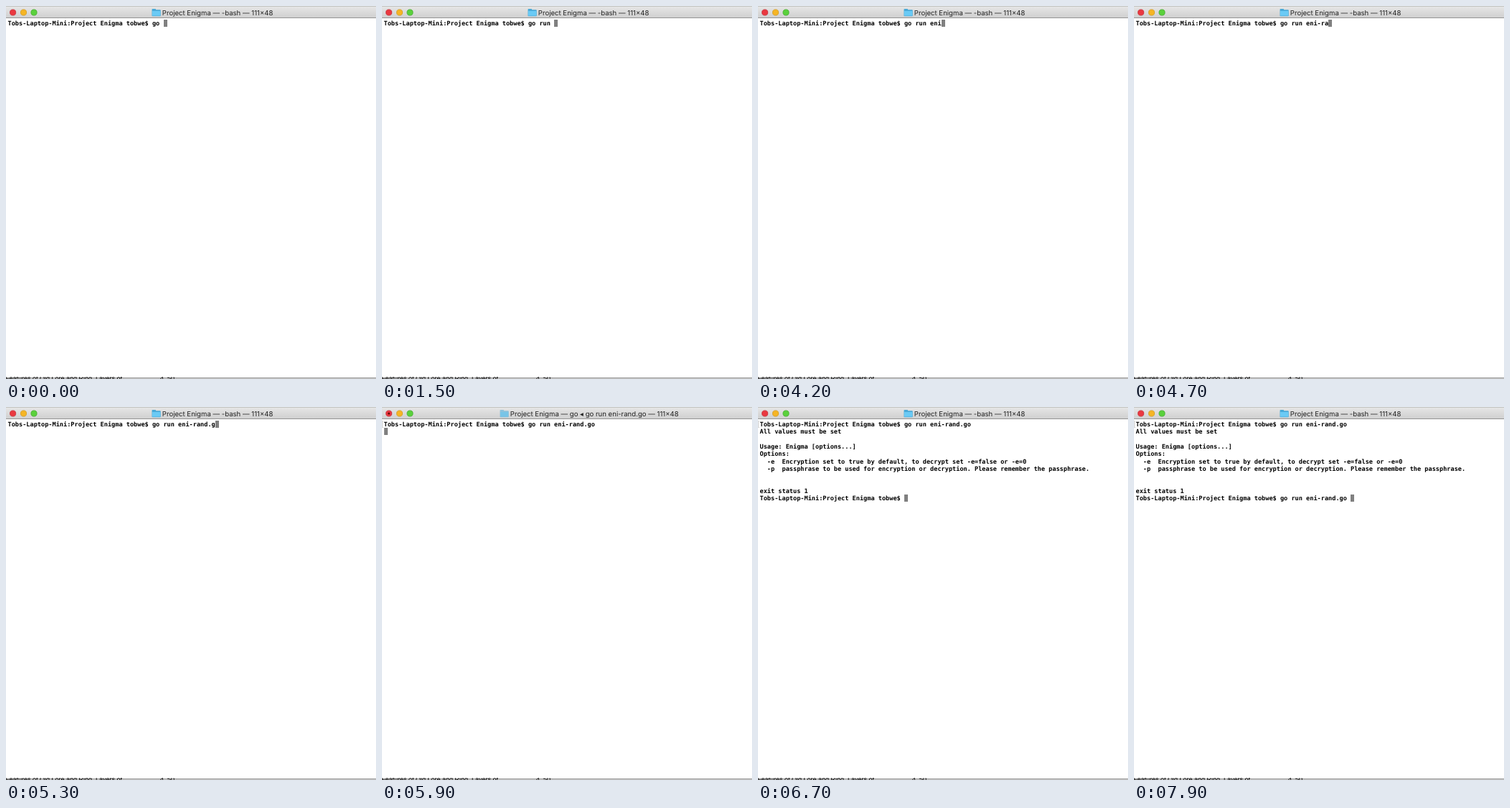
Write an HTML page with a canvas that moves like this. It is 516 px wide and 520 px high and loops after 8 s.

```html
<!DOCTYPE html>
<html lang="en">
<head>
<meta charset="utf-8">
<title>Terminal</title>
<style>
  html, body { margin: 0; width: 100%; height: 100%; overflow: hidden; background: #fff; }
  canvas { display: block; width: 516px; height: 520px; }
</style>
</head>
<body>
<canvas id="stage" width="516" height="520"></canvas>
<script>
const W = 516, H = 520, LOOP = 8000;
const ctx = document.getElementById('stage').getContext('2d');
ctx.textRendering = 'geometricPrecision';

const CELL_W = 5.167, CELL_H = 10.35, LEFT = 2.5, TOP = 18.6;
const MONO = 'bold 8.58px "DejaVu Sans Mono", monospace';
const SANS = '9.6px Inter, "DejaVu Sans", sans-serif';

const PROMPT = 'Tobs-Laptop-Mini:Project Enigma tobwe$ ';
const COMMAND = 'go run eni-rand.go';
const TYPED_AT_START = 3;
const KEY_TIMES = [900, 1100, 1300, 1500, 2600, 2800, 4200, 4400, 4600,
  4700, 4900, 5000, 5200, 5300, 5500];
const ENTER = 5800, OUTPUT = 6200, RECALL = 7000, LAST_SPACE = 7900;

const REPORT = [
  'All values must be set',
  '',
  'Usage: Enigma [options...]',
  'Options:',
  '  -e  Encryption set to true by default, to decrypt set -e=false or -e=0',
  '  -p  passphrase to be used for encryption or decryption. Please remember the passphrase.',
  '',
  '',
  'exit status 1'
];

// Each title change briefly shows a faded folder icon.
const TITLES = [
  { from: -1000, x: 203.5, text: '-bash' },
  { from: 5900, x: 164.5, text: 'go ◂ go run eni-rand.go', busy: true },
  { from: 6200, x: 163, text: 'link ◂ go run eni-rand.go', busy: true },
  { from: 6300, x: 203.5, text: '-bash' }
];

function rect(x, y, w, h, color) {
  ctx.fillStyle = color;
  ctx.fillRect(x, y, w, h);
}

function text(str, x, y, font, color) {
  ctx.font = font;
  ctx.fillStyle = color;
  ctx.fillText(str, x, y);
}

function disc(x, y, r, color, edge) {
  ctx.beginPath();
  ctx.arc(x, y, r, 0, Math.PI * 2);
  ctx.fillStyle = color;
  ctx.fill();
  if (edge) {
    ctx.strokeStyle = edge;
    ctx.lineWidth = 0.8;
    ctx.stroke();
  }
}

function folder(x, alpha) {
  ctx.save();
  ctx.globalAlpha = alpha;
  ctx.fillStyle = '#48a9d8';
  ctx.beginPath();
  ctx.roundRect(x, 4.1, 5.6, 4, 0.8);
  ctx.roundRect(x, 5.2, 12.2, 9, 0.8);
  ctx.fill();
  rect(x + 0.5, 7, 11.2, 6.6, '#6acaf5');
  ctx.restore();
}

function titleBar(t) {
  const shade = ctx.createLinearGradient(0, 0, 0, 16);
  shade.addColorStop(0, '#e7e7e7');
  shade.addColorStop(1, '#d0d0d0');
  rect(0, 0, W, 16, shade);
  rect(0, 0, W, 1, '#c2c4c0');
  rect(0, 16, W, 1, '#949494');

  const title = TITLES.findLast(item => t >= item.from);
  disc(9.6, 9, 4.1, '#ea3840', '#c4303a');
  disc(24.5, 9, 4.1, '#f6b524', '#d29a1e');
  disc(39, 9, 4.1, '#5ad13c', '#46ab30');
  if (title.busy) disc(9.6, 9, 1.6, '#6b0808');

  folder(title.x, t - title.from < 100 ? 0.55 : 1);
  text(`Project Enigma — ${title.text} — 111×48`, title.x + 14.3, 12.5, SANS, '#222');
}

function line(str, row) {
  text(str, LEFT, TOP + row * CELL_H + 8.3, MONO, '#000');
}

function cursor(col, row) {
  const x = Math.round(LEFT + col * CELL_W);
  const y = Math.round(TOP + row * CELL_H);
  rect(x, y, 5, 10, '#808080');
}

function inputLine(str, row) {
  line(PROMPT + str, row);
  cursor(PROMPT.length + str.length, row);
}

function promptMark() {
  ctx.strokeStyle = '#bdbdbd';
  ctx.lineWidth = 0.7;
  ctx.beginPath();
  ctx.moveTo(2, 19.5);
  ctx.lineTo(0.6, 19.5);
  ctx.lineTo(0.6, 28.5);
  ctx.lineTo(2, 28.5);
  ctx.stroke();
}

function terminal(t) {
  if (t < ENTER) {
    const typed = TYPED_AT_START + KEY_TIMES.filter(key => t >= key).length;
    inputLine(COMMAND.slice(0, typed), 0);
    return;
  }
  promptMark();
  line(PROMPT + COMMAND, 0);
  if (t < OUTPUT) {
    cursor(0, 1);
    return;
  }
  REPORT.forEach((str, i) => line(str, i + 1));
  const recalled = t < RECALL ? '' : COMMAND + (t < LAST_SPACE ? '' : ' ');
  inputLine(recalled, REPORT.length + 1);
}

// Sliver of the window behind, along the bottom edge.
function bottomEdge() {
  const font = '9px "Liberation Sans", Arial, sans-serif';
  ctx.save();
  ctx.beginPath();
  ctx.rect(0, 517, W, 3);
  ctx.clip();
  rect(0, 518, W, 1, '#8a8a8a');
  rect(0, 519, W, 1, '#d4d4d4');
  text('Features of Old Lore and Ring, Layers of', -1, 522, font, '#000');
  text('4, 50', 215, 522, font, '#000');
  ctx.restore();
}

function draw(now) {
  const t = now % LOOP;
  rect(0, 0, W, H, '#fff');
  terminal(t);
  titleBar(t);
  bottomEdge();
}

const start = performance.now();
function tick() {
  draw(performance.now() - start);
  requestAnimationFrame(tick);
}
tick();
</script>
</body>
</html>
```
